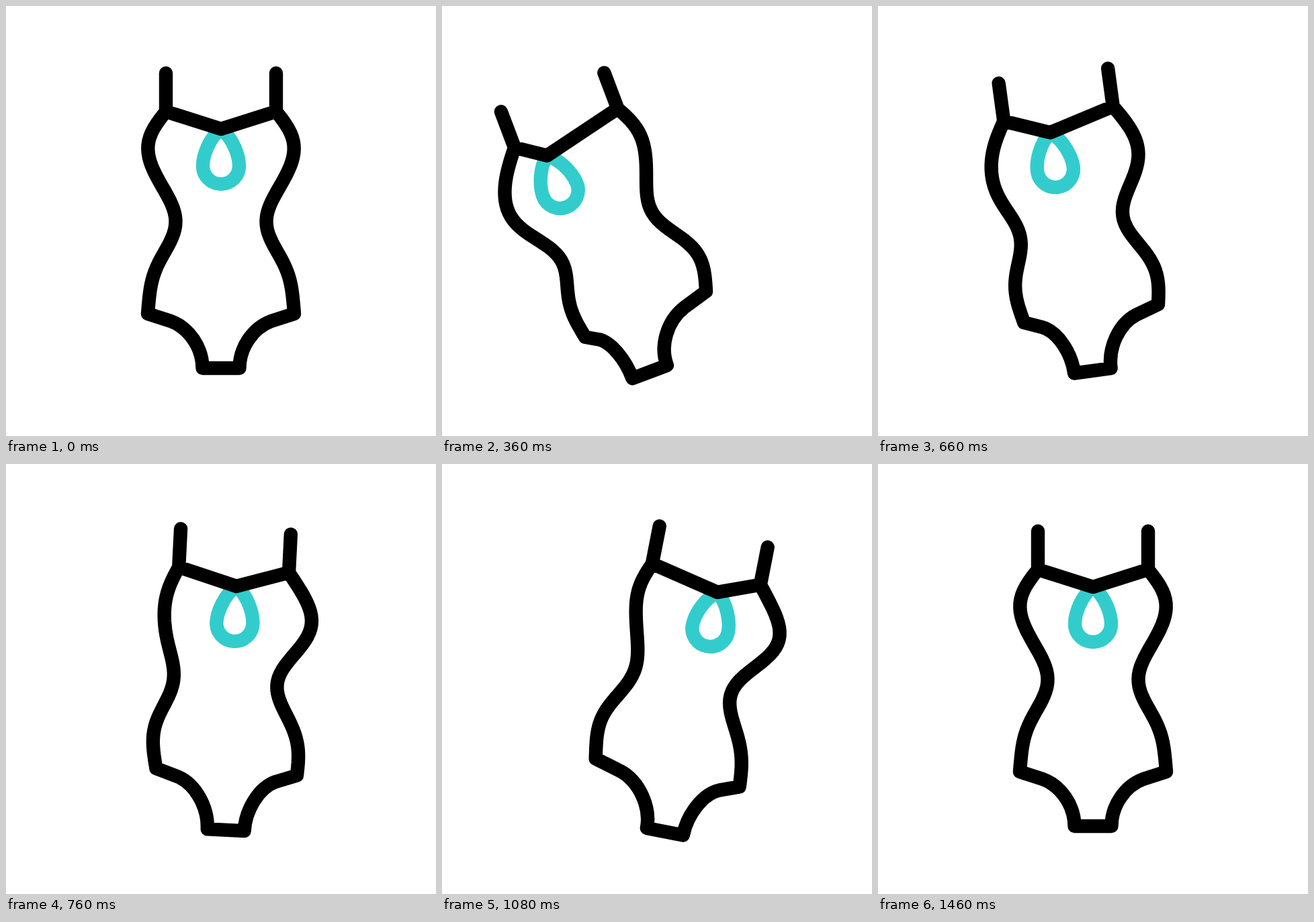
An HTML page that plays this animation: 640 px wide and 640 px high, repeating every 2400 ms.

```html
<!DOCTYPE html>
<html>
<head>
<meta charset="utf-8">
<style>
  html, body { margin: 0; height: 100%; overflow: hidden; background: #fff; }
  svg { display: block; width: 100%; height: 100%; }
  path { fill: none; stroke: #000; stroke-width: 20.4; stroke-linecap: round; stroke-linejoin: round; }
  #drop { stroke: #3cc; }
</style>
</head>
<body>
<svg viewBox="0 0 640 640">
  <g id="suit">
    <path id="drop" d="M0 0C-18 14-27 40-27 55C-27 70-15 82 0 82S27 70 27 55C27 40 18 14 0 0Z"/>
    <path id="body"/>
  </g>
</svg>
<script>
const LOOP = 2400, STRAP = 82, TOP = -383, HIP = -82, HEM = 27.5;

// Each side holds its hip width and the sine harmonics that bend its seam.
const restSide = [109, -10.6, 13.8, 15.4, 0.1, -0.3, 0.9];
const rest = { lean: 0, neck: [0, -357], hem: [0, -1], left: restSide, right: restSide };
const swungLeft = {
  lean: -22.6, neck: [-45, -354.5], hem: [-12.8, 0.6],
  left: [81, 21.6, 22.4, 9.7, -5.3, -0.3, 0.9],
  right: [109, -4.1, 0.1, 15.7, -1.6, -0.3, 0.9]
};
const swungRight = {
  lean: 13.4, neck: [26, -360.5], hem: [15.8, 6],
  left: [109, -5.8, -2.9, 11.4, -0.6, -0.3, 0.9],
  right: [109, 1, 25.8, 16.4, -4, -2.6, -0.3]
};
const keys = [[0, rest], [440, swungLeft], [940, swungRight], [1467, rest], [LOOP, rest]];

const [suit, drop, body] = ['suit', 'drop', 'body'].map(id => document.getElementById(id));
const ease = x => x * x * (3 - 2 * x);
const mix = (a, b, u) => Array.isArray(a) ? a.map((n, i) => mix(n, b[i], u)) : a + (b - a) * u;

function poseAt(time) {
  const i = keys.findIndex(([start]) => start > time);
  const [t0, from] = keys[i - 1], [t1, to] = keys[i];
  const u = ease((time - t0) / (t1 - t0));
  return Object.fromEntries(Object.keys(from).map(k => [k, mix(from[k], to[k], u)]));
}

// Seam from strap to hip, then the leg opening down to the hem; side is -1 or 1.
function sidePath(side, [hip, ...waves], [hemX, hemY]) {
  const seam = [];
  for (let i = 0; i <= 48; i++) {
    const s = i / 48;
    const width = waves.reduce((sum, a, k) => sum + a * Math.sin((k + 1) * Math.PI * s),
      mix(STRAP, hip, s));
    seam.push([side * width, mix(TOP, HIP, s)]);
  }
  const hem = HEM + side * hemX;
  const leg = (u, y) => [side * mix(hip, hem, u), y];
  return `M${seam.join('L')}L${leg(0.42, -71)}C${leg(0.75, -61)} ${leg(1, hemY - 31)} ${leg(1, hemY)}`;
}

function draw(now) {
  const { lean, neck, hem, left, right } = poseAt(now % LOOP);
  suit.setAttribute('transform', `translate(320 540) rotate(${lean})`);
  drop.setAttribute('transform', `translate(${neck})`);
  body.setAttribute('d',
    `M${-STRAP},-440V${TOP}L${neck}L${STRAP},${TOP}V-440` +
    sidePath(-1, left, hem) + sidePath(1, right, hem) +
    `M${hem[0] - HEM},${hem[1]}h${2 * HEM}`);
}

function tick() {
  draw(performance.now());
  requestAnimationFrame(tick);
}
tick();
</script>
</body>
</html>
```
